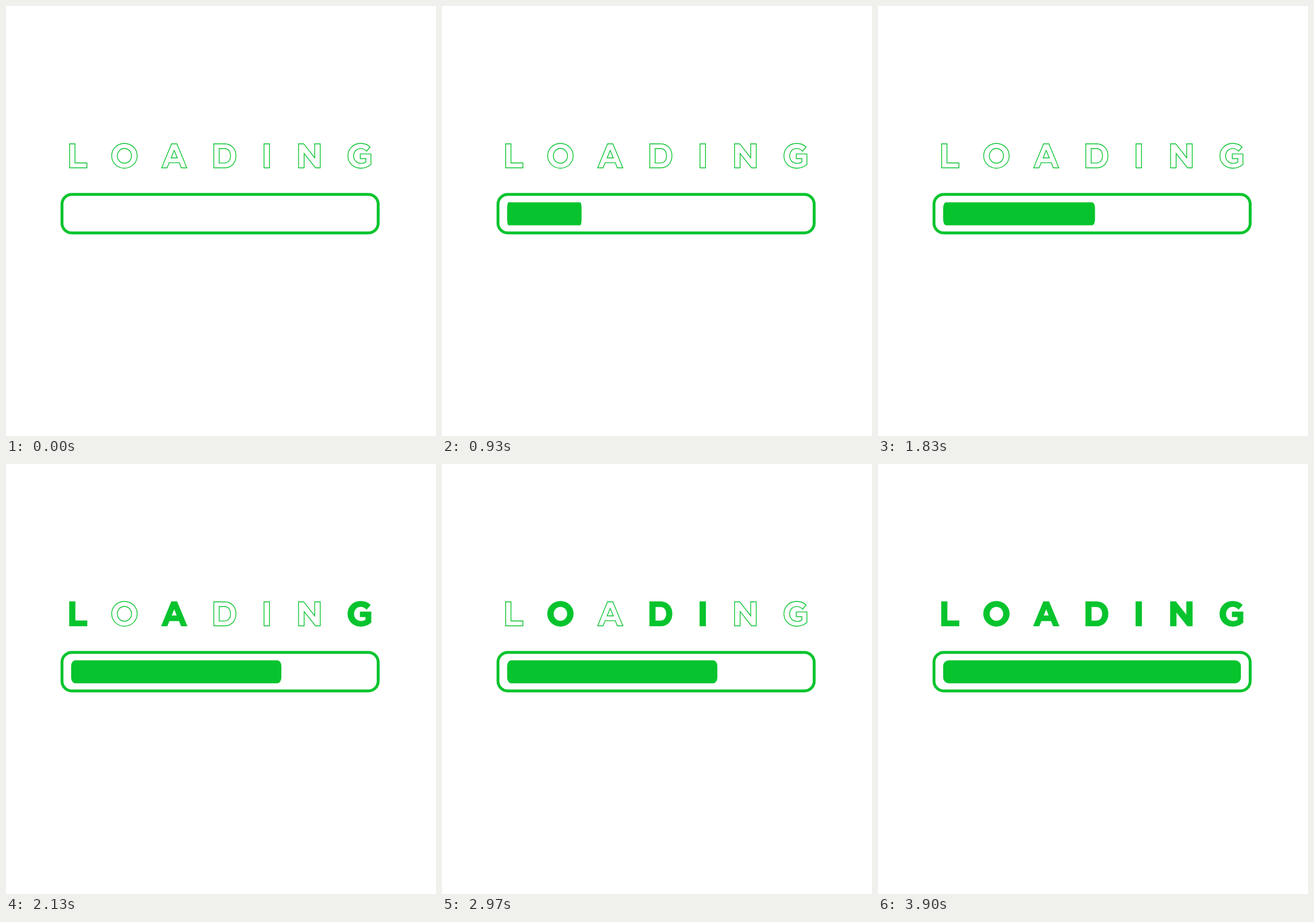
Recreate the animation shown at these times as an HTML page. Size 748x748 px, loop 4050 ms.

```html
<!DOCTYPE html>
<html lang="en">
<head>
<meta charset="utf-8">
<title>Loading</title>
<style>
  html, body { margin: 0; width: 100%; height: 100%; overflow: hidden; background: #fff; }
  svg { display: block; width: 100vw; height: 100vh; }
  .letter { stroke: #07c42e; stroke-width: 1.35; fill: none; fill-rule: evenodd; }
  .letter.lit { fill: #07c42e; }
  .frame { fill: none; stroke: #07c42e; stroke-width: 5; }
  .bar { fill: #07c42e; }
</style>
</head>
<body>
<svg viewBox="0 0 748 748" role="img" aria-label="LOADING">
  <g id="word"></g>
  <rect class="frame" x="97.4" y="327.7" width="550" height="67" rx="17"/>
  <rect class="bar" id="bar" width="518" height="40" rx="10"/>
</svg>
<script>
const LOOP = 4050;
const STEP = 30;

const shapes = {
  L: 'M110.7 239.7H120V273H140.7V281.5H110.7Z',
  O: 'M183.8 260.6a22.2 21.6 0 1 0 44.4 0a22.2 21.6 0 1 0 -44.4 0Z' +
     'M193.6 260.6a12.4 12.9 0 1 0 24.8 0a12.4 12.9 0 1 0 -24.8 0Z',
  A: 'M288 239.7H297.2L314.6 281.5H305L301.4 272.6H283.8L280.2 281.5H270.8Z' +
     'M292.6 251.2L287.2 264.2H298Z',
  D: 'M361.5 239.7H380.3C392 239.7 400 248.2 400 260.6S392 281.5 380.3 281.5H361.5Z' +
     'M370.8 248V273.1H379.8C386.6 273.1 390.6 268 390.6 260.6S386.6 248 379.8 248Z',
  I: 'M448.8 239.7H458.4V281.5H448.8Z',
  N: 'M508.9 239.7H517.8L537 264V239.7H546.6V281.5H538.4L518.6 256.6V281.5H508.9Z',
  G: 'M633.4 245.3L627.3 252.4C624.3 249.4 621.3 247.8 617.2 247.8' +
     'C610 247.8 604.7 253.4 604.7 260.6C604.7 268.2 610 273.8 617.8 273.8' +
     'C621.2 273.8 623.9 272.9 626 271.4V265.5H616.3V257.4H634.8V275.6' +
     'C630.6 279.4 624.8 282.2 617.6 282.2C604 282.2 594.8 273 594.8 260.6' +
     'C594.8 248.6 604.2 239 617 239C624.6 239 629.2 241.2 633.4 245.3Z'
};

// Each letter flickers on, off, on from its start, counted in steps.
const rounds = [
  { at: 0,    order: 'LGAOIDN', starts: [1, 4, 6, 9, 12, 14, 18] },
  { at: 930,  order: 'AGILNOD', starts: [1, 4, 8, 11, 13, 14, 15], blink: { I: 18 } },
  { at: 1830, order: 'LGAOIDN', starts: [1, 4, 6, 9, 11, 13, 17] },
  { at: 2730, order: 'DIOLNGA', starts: [1, 4, 6, 9, 11, 13, 17] },
  { at: 3330, order: 'OGILNAD', starts: [1, 4, 6, 9, 11, 14, 17] }
];

// Time and share of the full bar width.
const levels = [[0, 0], [600, 0.25], [1200, 0.51], [2100, 0.706], [3000, 0.837], [3900, 1]];

const word = document.getElementById('word');
const bar = document.getElementById('bar');
const letters = {};
for (const name of 'LOADING') {
  const path = document.createElementNS('http://www.w3.org/2000/svg', 'path');
  path.setAttribute('class', 'letter');
  path.setAttribute('d', shapes[name]);
  letters[name] = word.appendChild(path);
}

function isLit(round, name, step) {
  const age = step - round.starts[round.order.indexOf(name)];
  const dip = round.blink && round.blink[name] === step;
  return age >= 0 && age !== 1 && !dip;
}

function draw(time) {
  const round = rounds.findLast(r => r.at <= time);
  const step = Math.floor((time - round.at) / STEP);
  for (const name in letters) {
    letters[name].classList.toggle('lit', isLit(round, name, step));
  }
  const level = levels.findLast(l => l[0] <= time)[1];
  bar.setAttribute('transform', `translate(113.3 341.5) scale(${level} 1)`);
  bar.setAttribute('visibility', level ? 'visible' : 'hidden');
}

const begin = performance.now();
function tick() {
  draw((performance.now() - begin) % LOOP);
  requestAnimationFrame(tick);
}
tick();
</script>
</body>
</html>
```
